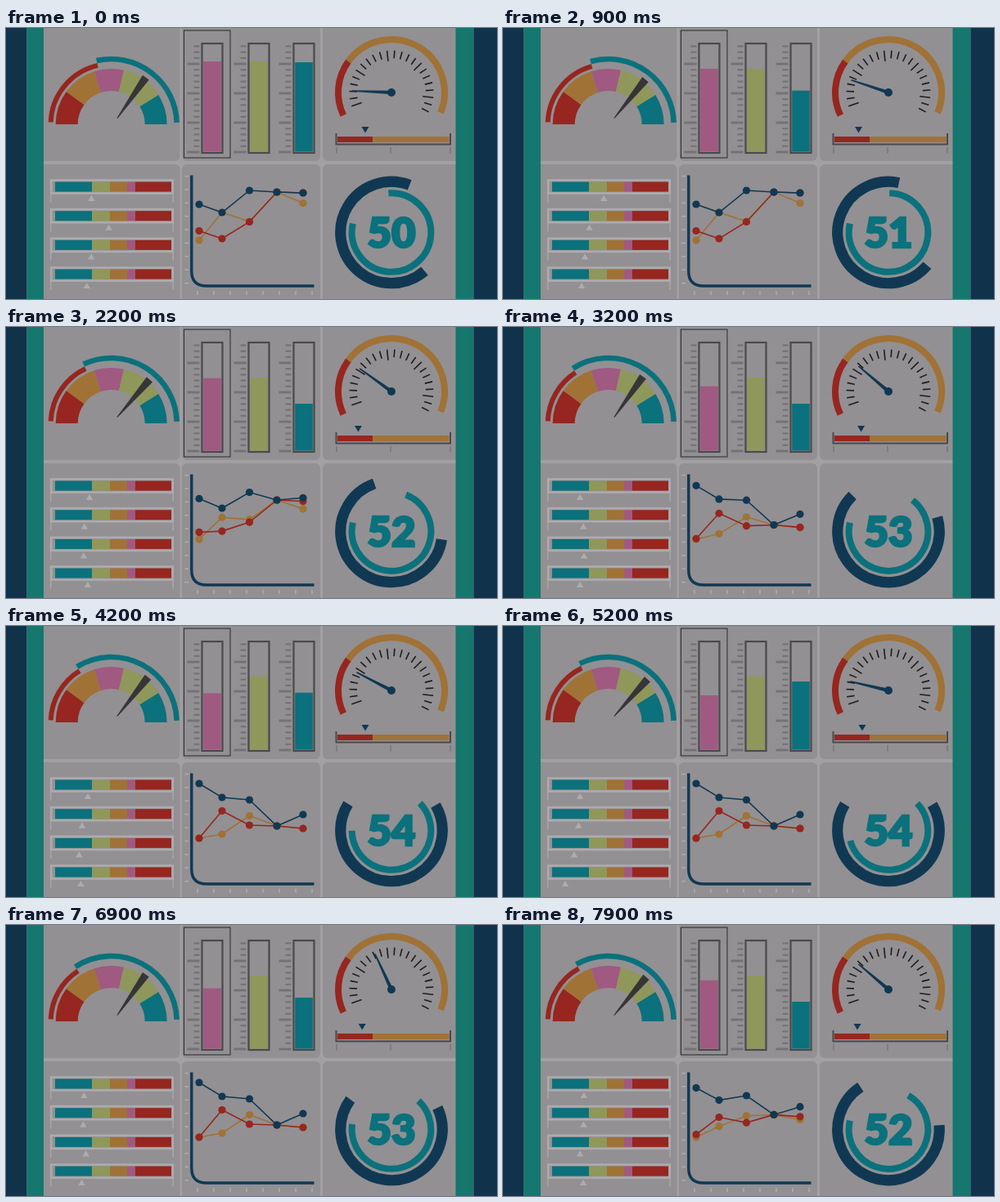
An HTML page that plays this animation: 600x332 px, repeating every 8 s.

```html
<!DOCTYPE html>
<html lang="en">
<head>
<meta charset="utf-8">
<title>Dashboard</title>
<style>
  html, body { margin: 0; width: 100%; height: 100%; overflow: hidden; background: #10324a; }
  svg { display: block; width: 600px; height: 332px; }
  text { font: 900 51px Lato, "Open Sans", sans-serif; }
</style>
</head>
<body>
<svg id="stage" viewBox="0 0 600 332"></svg>
<script>
const RED = '#96261f', ORANGE = '#a07236', PINK = '#a05981', LIME = '#8f975a',
  TEAL = '#0b717c', NAVY = '#113852', PANEL = '#929093', LIGHT = '#adabae',
  FRAME = '#4a494c', TICK = '#747276';
const LOOP = 8000, STEP = 100;
const stage = document.getElementById('stage');

function set(el, attrs) {
  for (const k in attrs) el.setAttribute(k, attrs[k]);
  return el;
}
function add(tag, attrs) {
  return stage.appendChild(set(document.createElementNS('http://www.w3.org/2000/svg', tag), attrs));
}
const rect = (x, y, x2, y2, fill, more) =>
  add('rect', { x, y, width: x2 - x, height: y2 - y, fill, ...more });
const line = (d, stroke, width) =>
  add('path', { d, stroke, 'stroke-width': width, fill: 'none' });
const shape = (d, fill) => add('path', { d, fill });

// Angles in degrees, counter-clockwise from the right.
function polar(cx, cy, r, deg) {
  const a = deg * Math.PI / 180;
  return `${(cx + r * Math.cos(a)).toFixed(2)} ${(cy - r * Math.sin(a)).toFixed(2)}`;
}
function arc(cx, cy, r, from, to) {
  const large = Math.abs(to - from) > 180 ? 1 : 0;
  return `M${polar(cx, cy, r, from)}A${r} ${r} 0 ${large} ${to > from ? 0 : 1} ${polar(cx, cy, r, to)}`;
}

const lerp = (a, b, u) => a + (b - a) * u;
const wave = u => (1 - Math.cos(u * Math.PI)) / 2;
const ramp = (t, from, to) => Math.min(1, Math.max(0, (t - from) / (to - from)));
const pulse = (t, from, peak, to) => ramp(t, from, peak) - ramp(t, peak, to);

// Shared drivers: the main value rises, rests and falls; the dip comes once per loop.
const main = t => ramp(t, -100, 4460) - ramp(t, 6150, 10710);
const dip = t => pulse(t, 3300, 5200, 7300);
const updates = [];

function background() {
  rect(0, 0, 600, 332, '#a2a0a3');
  for (const [x, x2] of [[30, 212.5], [215, 384], [387, 570]])
    for (const [y, y2] of [[-10, 163], [167, 342]])
      rect(x, y, x2, y2, PANEL, { rx: 6 });
  rect(0, 0, 25.5, 332, '#10324a');
  rect(25.5, 0, 46, 332, '#15776e');
  rect(549.5, 0, 571.5, 332, '#15776e');
  rect(571.5, 0, 600, 332, '#10324a');
}

function fanGauge() {
  const cx = 128.7, cy = 118, stops = [180, 144, 108, 77, 32, 0];
  [RED, ORANGE, PINK, LIME, TEAL].forEach((c, i) =>
    line(arc(cx, cy, 54.5, stops[i], stops[i + 1]), c, 27));
  const low = line('', RED, 6), high = line('', TEAL, 6.6);
  const needle = shape('M-1 0L60 -4.8V4.8L-1 1Z', '#363537');
  updates.push(t => {
    const split = 103 + 24 * wave(main(t)) - 11 * dip(t);
    const turn = 51 + 3.5 * Math.cos(2 * Math.PI * t / 3400);
    set(low, { d: arc(cx, cy, 74, 178, split) });
    set(high, { d: arc(cx, cy, 80, split, 1.5) });
    set(needle, { transform: `translate(136 109.5) rotate(${-turn})` });
  });
}

function tubes() {
  rect(217.5, 3, 274, 159, 'none', { stroke: '#29282a' });
  const tube = (x, color, level) => {
    for (let i = 0; i < 19; i++) {
      const major = i % 5 === 3, y = 22.4 + i * 7.2;
      line(`M${x - (major ? 17 : 9)} ${y}H${x - 2}`, TICK, major ? 3 : 2.2);
    }
    rect(x + 1, 19, x + 26, 153, 'none', { stroke: FRAME, 'stroke-width': 2.2 });
    const fill = rect(x + 2.7, 40, x + 24.3, 151.5, color);
    updates.push(t => {
      const y = level(t);
      set(fill, { y, height: 151.5 - y });
    });
  };
  const fall = t => 40 + 45 * main(t);
  tube(238.5, PINK, fall);
  tube(295.5, LIME, t => Math.min(62, fall(t)));
  tube(350.5, TEAL, t => lerp(42, 94, ramp(t, 0, 1350)) - 26 * dip(t));
}

function dial() {
  const cx = 471, cy = 79;
  line(arc(cx, cy, 65, 205.5, 144), RED, 8);
  line(arc(cx, cy, 65, 144, -22.5), ORANGE, 8);
  for (let i = 0; i < 23; i++) {
    const a = 199 - i * 10.3, inner = i % 5 ? 42 : 38.5;
    line(`M${polar(cx, cy, inner, a)}L${polar(cx, cy, 51.5, a)}`, '#1d1c1e', 1.6);
  }
  const hand = shape('M0 -2.2L-48 -0.8V0.8L0 2.2Z', NAVY);
  add('circle', { cx, cy, r: 5, fill: NAVY });

  rect(405, 133, 448, 140, RED);
  rect(448, 133, 541.5, 140, ORANGE);
  line('M403.5 129V142.5H543V129', FRAME, 2);
  for (const x of [404, 470, 543]) line(`M${x} 146V153.5`, TICK, 1.3);
  const mark = shape('M-4.5 121H4.5L0 128.5Z', NAVY);
  updates.push(t => {
    const rise = Math.sin(ramp(t, 0, 3200) * Math.PI / 2);
    const turn = 2.4 + 38 * rise - 27 * dip(t) + 30 * pulse(t, 5200, 6900, 7900);
    const x = 439 - 10 * pulse(t, 0, 2000, 3400) - 6 * ramp(t, 5200, 7900);
    set(hand, { transform: `translate(${cx} ${cy}) rotate(${turn})` });
    set(mark, { transform: `translate(${x} 0)` });
  });
}

function sliders() {
  const stops = [60, 105, 127, 148, 158, 202];
  for (let row = 0; row < 4; row++) {
    const y = 188.5 + row * 35.7;
    rect(55.2, y - 2, 203.8, y + 14, 'none', { stroke: LIGHT, 'stroke-width': 2.6 });
    [TEAL, LIME, ORANGE, PINK, RED].forEach((c, i) => rect(stops[i], y, stops[i + 1], y + 12, c));
    line(`M54.8 ${y + 15}V${y + 25}M204.2 ${y + 15}V${y + 25}`, LIGHT, 1.2);
    const mark = shape(`M-4.3 ${y + 23.5}H4.3L0 ${y + 16.3}Z`, LIGHT);
    // Each row runs ahead of the one above it and dips deeper.
    const peak = 900 - 900 * row;
    updates.push(t => {
      const sway = 3 * Math.cos(Math.PI * (t - 2200) / 1000 + 2 * row);
      const x = 97 + 28 * pulse(t, peak - 1100, peak, peak + 1400) - 6 * row * dip(t) + sway;
      set(mark, { transform: `translate(${x} 0)` });
    });
  }
}

function chart() {
  const xs = [236, 264, 297.5, 331, 363];
  for (let i = 0; i < 9; i++) line(`M218.5 ${181.5 + i * 16.4}H223`, LIGHT, 1.6);
  for (let i = 0; i < 8; i++) line(`M${234 + i * 20} 322V327`, LIGHT, 1.6);
  line('M226.8 180.5V298Q226.8 316 245 316H376.5', NAVY, 3.4);
  const series = (color, from, to) => {
    const path = line('', color, 1.6);
    const dots = xs.map(cx => add('circle', { cx, r: 4.6, fill: color }));
    updates.push(t => {
      const m = wave(ramp(t, 1550, 3500)) - wave(ramp(t, 7200, 9150));
      const ys = from.map((y, i) => lerp(y, to[i], m));
      set(path, { d: 'M' + xs.map((x, i) => `${x} ${ys[i].toFixed(2)}`).join('L') });
      dots.forEach((dot, i) => set(dot, { cy: ys[i] }));
    });
  };
  series(ORANGE, [260, 226, 237, 201, 214.5], [260, 255, 232.5, 245, 248]);
  series(RED, [248.5, 258, 237.5, 201, 202], [260, 226.5, 244, 245, 248]);
  series(NAVY, [216, 226, 199, 201, 202], [193, 210, 213, 245, 231]);
}

function rings() {
  const cx = 471, cy = 250.5;
  const outer = line('', NAVY, 13.2), inner = line('', TEAL, 8);
  const label = add('text', {
    x: 471, y: 268.5, 'text-anchor': 'middle', fill: TEAL, stroke: TEAL, 'stroke-width': 2.4
  });
  updates.push(t => {
    const p = main(t), e = wave(p), turn = 80 * e;
    set(outer, { d: arc(cx, cy, 62.2, 69 + turn, 310.5 + turn) });
    set(inner, { d: arc(cx, cy, 48.3, lerp(94.4, 43.5, e), 28 * dip(t) - 193) });
    label.textContent = Math.round(50 + 4 * p);
  });
}

[background, fanGauge, tubes, dial, sliders, chart, rings].forEach(draw => draw());

const start = performance.now();
function frame() {
  const t = (performance.now() - start) % LOOP;
  const held = Math.floor(t / STEP) * STEP;
  updates.forEach(update => update(held));
  requestAnimationFrame(frame);
}
frame();
</script>
</body>
</html>
```
